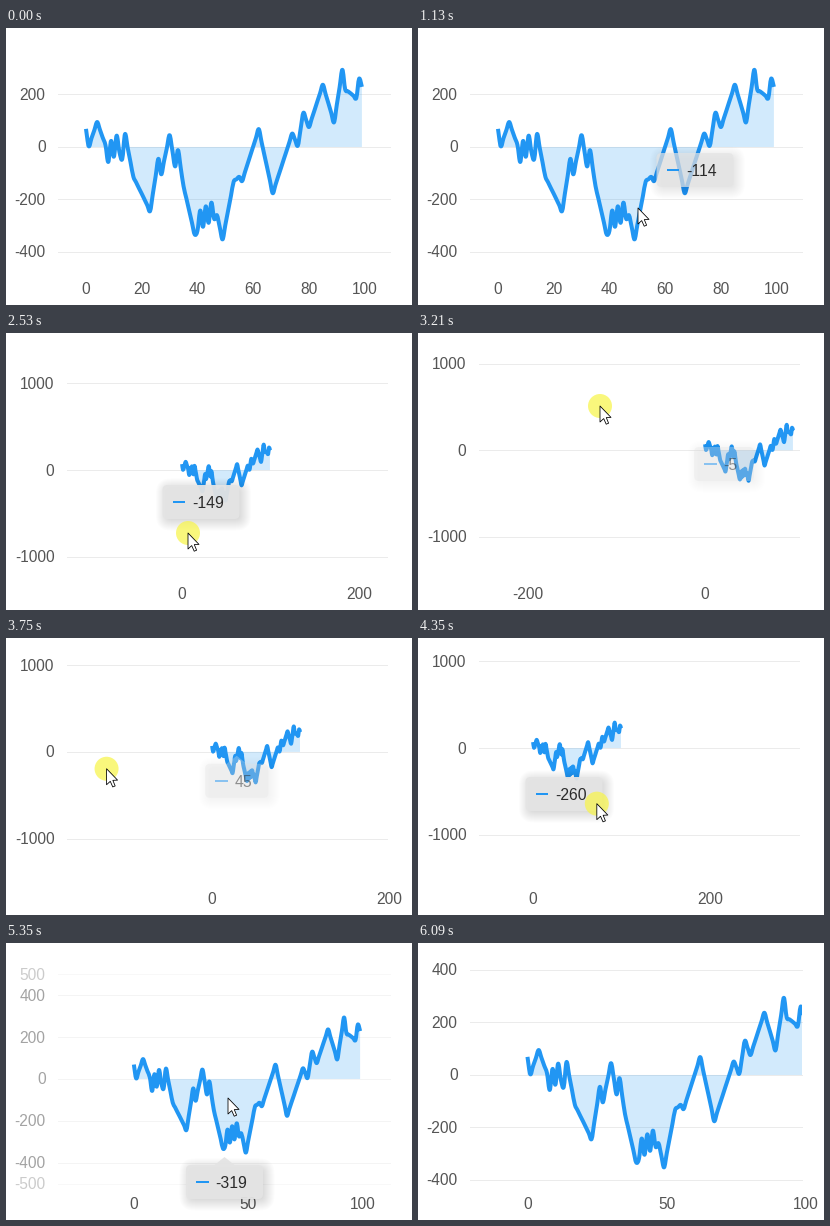
Recreate the animation shown at these times as a matplotlib script. Size 406x277 px, loop 6490 ms.

```python
import numpy as np
import matplotlib.pyplot as plt
from matplotlib.animation import FuncAnimation
from matplotlib.lines import Line2D
from matplotlib.patches import Circle, FancyBboxPatch, PathPatch, Polygon, Rectangle
from matplotlib.path import Path

W, H, DPI = 406, 277, 64
LOOP, INTERVAL, TICKS = 6490, 22, 97
PT = 72 / DPI
BLUE, GRID, INK, PANEL = "#2196f3", "#ebebeb", "#555555", "#e4e4e4"
TOP, BOTTOM, LABEL_Y = 15, 248, 266

plt.rcParams["font.family"] = "Liberation Sans"

# turning points of the series; a zigzag is added on top in two places
TURNS = [(0, 69), (1, 3), (4, 95), (8, -22), (11, 8), (13, -46), (14, 49), (17, -113),
         (23, -244), (26, -45), (27, -104), (30, 45), (32, -74), (33, -12), (35, -149),
         (39, -333), (40, -284), (46, -239), (47, -260), (49, -352), (53, -132),
         (55, -114), (56, -130), (62, 68), (67, -176), (74, 51), (76, 5), (78, 130),
         (80, 76), (85, 237), (89, 94), (92, 294), (93, 220), (97, 187), (98, 260), (99, 229)]

# data point the view turns on, and where it lies on the stage: tick, x, y
FOCUS = (50.6, -102.9)
CENTRE = [(38, 221, 146), (48, 332, 126.2), (65, 160, 119), (80, 243.5, 157.5),
          (87, 250.5, 159)]

# pointer outside the drag: tick, x, y
POINTER = [(8, 311, 266), (12, 292, 240), (14, 292, 240), (17, 220, 180), (21, 221, 146),
           (33, 221, 146), (37, 181, 200), (65, 178, 166), (74, 222, 155), (84, 222, 155),
           (87, 330, 235)]

# tick, data index, centre x, centre y
TOOLTIP = [(14, 76, 322, 75), (17, 55, 277, 142), (21, 50, 214, 223), (34, 50, 219, 195),
           (38, 35, 195, 169), (48, 15, 306, 131), (65, 47, 146, 156), (80, 40, 218.5, 239)]

ARROW = np.array([(0, 0), (0, 16), (3.7, 12.6), (6.2, 18.2), (8.6, 17.2), (6.3, 11.6),
                  (11, 11.4)])

# step: smallest and largest scale at which it is used
Y_STEPS = {200: (.18, 9), 500: (.1, .23), 1000: (.001, .15)}
X_STEPS_BEFORE = {20: (2.1, 9), 50: (1.4, 2.6), 100: (.95, 2), 200: (.01, 1.4)}
X_STEPS_AFTER = {50: (1.4, 9), 100: (.95, 2), 200: (.01, 1.4)}

fig = plt.figure(figsize=(W / DPI, H / DPI), dpi=DPI, facecolor="white")
ax = fig.add_axes([0, 0, 1, 1])
ax.set(xlim=(0, W), ylim=(H, 0))
ax.axis("off")
scene = []


def at(table, tick):
    ticks, *columns = zip(*table)
    return [np.interp(tick, ticks, c) for c in columns]


def ramp(x, start, end):
    return float(np.clip((x - start) / (end - start), 0, 1))


def ease_out(x, start, end):
    return 1 - (1 - ramp(x, start, end)) ** 2


def make_series():
    i = np.arange(100)
    trend = np.interp(i, *zip(*TURNS))
    jagged = ((i >= 8) & (i <= 11)) | ((i >= 40) & (i <= 46))
    return np.round(trend - 35 * (-1.0) ** i * jagged).astype(int)


VALUES = make_series()


def view(tick):
    """Origin and scales of the chart."""
    zoom = 1 - ease_out(tick, 23, 34) + ease_out(tick, 73, 87.4)
    sx = .887 + 1.9 * zoom
    sy = .0867 + .1758 * zoom ** 1.18
    cx, cy = at(CENTRE, tick)
    return cx - FOCUS[0] * sx, cy + FOCUS[1] * sy, sx, sy


def pointer(tick):
    """Tip of the pointer; the drag is one turn of a shrinking ellipse."""
    if not 38 <= tick <= 65:
        return at(POINTER, tick)
    angle = np.pi * (.5 - ramp(tick, 38, 48) - .98 * ramp(tick, 48, 65))
    size = 1 - .54 * ramp(tick, 48, 65)
    return [182 + 110 * size * np.cos(angle), 136.5 + 63.5 * size * np.sin(angle)]


def put(artist):
    ax.add_artist(artist)
    scene.append(artist)
    artist.set_zorder(len(scene))
    return artist


def write(x, y, text, align, color=INK, size=15.5, alpha=1):
    label = ax.text(x, y, text, ha=align, va="baseline", color=color,
                    fontsize=size * PT, alpha=alpha)
    scene.append(label)
    label.set_zorder(len(scene))


def spline(points):
    """Smooth Bezier path through the points."""
    slope = np.gradient(points, axis=0) / 3
    slope[[0, -1]] *= .5
    verts = np.stack([points[:-1] + slope[:-1], points[1:] - slope[1:], points[1:]], axis=1)
    verts = np.vstack([points[:1], verts.reshape(-1, 2)])
    return verts, [Path.MOVETO] + [Path.CURVE4] * (len(verts) - 1)


def axis_marks(steps, scale, low, high):
    """Opacity of every axis value between low and high."""
    marks = {}
    for step, (least, most) in steps.items():
        alpha = ramp(scale, least, 1.3 * least) * ramp(scale, most, .7 * most)
        if alpha > 0:
            for n in range(int(np.ceil(low / step)), int(np.floor(high / step)) + 1):
                marks[n * step] = max(alpha, marks.get(n * step, 0))
    return marks


def draw_chart(tick):
    x0, y0, sx, sy = view(tick)
    left = np.interp(sy, [.1, .2], [61, 52])
    right = np.interp(sy, [.1, .2], [380.5, 384])

    for value, alpha in axis_marks(Y_STEPS, sy, (y0 - 246) / sy, (y0 - 18) / sy).items():
        y = y0 - value * sy
        put(Line2D([left, right], [y, y], color=GRID, lw=PT, alpha=alpha))
        write(left - 12.5, y + 5.5, f"{value}", "right", alpha=alpha)

    x_steps = X_STEPS_BEFORE if tick < 45 else X_STEPS_AFTER
    for value, alpha in axis_marks(x_steps, sx, (left - x0) / sx, (right + 5 - x0) / sx).items():
        write(x0 + value * sx, LABEL_Y, f"{value}", "center", alpha=alpha)

    points = np.column_stack([x0 + np.arange(len(VALUES)) * sx, y0 - VALUES * sy])
    verts, codes = spline(points)
    ends = [(points[-1, 0], y0), (points[0, 0], y0), (points[0, 0], y0)]
    area = Path(np.vstack([verts, ends]), codes + [Path.LINETO] * 2 + [Path.CLOSEPOLY])
    window = Rectangle((left, BOTTOM), right - left, TOP - BOTTOM, transform=ax.transData)
    for patch in (PathPatch(area, fc=BLUE, ec="none", alpha=.2),
                  PathPatch(Path(verts, codes), fc="none", ec=BLUE, lw=4 * PT,
                            capstyle="butt", joinstyle="round")):
        put(patch).set_clip_path(window)


def rounded(cx, cy, w, h, radius, color, alpha):
    put(FancyBboxPatch((cx - w / 2 + radius, cy - h / 2 + radius), w - 2 * radius,
                       h - 2 * radius, boxstyle=f"round,pad={radius}", fc=color,
                       ec="none", alpha=alpha))


def draw_tooltip(tick):
    index, cx, cy = at(TOOLTIP, tick)
    value = VALUES[round(index)]
    x0, y0, sx, sy = view(tick)

    # fades while the pointer is beside the series
    px = pointer(tick)[0]
    outside = max(x0 - px, px - x0 - 99 * sx, 0)
    alpha = ramp(tick, 14, 18) * ramp(tick, 87, 84) * (1 - min(.65, outside / 150))
    if alpha == 0:
        return

    text = f"{value}"
    w, h = 46 + 8.6 * len(text) - 3.4 * (value < 0), 34
    left, top = cx - w / 2, cy - h / 2
    for grow in range(-2, 10):
        rounded(cx + 2.5, cy + 2.5, w + 2 * grow, h + 2 * grow, 6 + grow, "black", .012 * alpha)
    rounded(cx, cy, w, h, 5, PANEL, .95 * alpha)
    if top - 8 > y0 - value * sy:
        put(Polygon([(cx - 10, top), (cx, top - 8), (cx + 10, top)], fc=PANEL, ec="none",
                    alpha=.95 * alpha))
    ink = min(1, alpha * 1.4)
    put(Line2D([left + 10, left + 22.5], [cy, cy], color=BLUE, lw=2 * PT, alpha=ink,
               solid_capstyle="butt"))
    write(left + 29.5, cy + 5.8, text, "left", "#2b2b2b", 15.8, ink)


def draw_pointer(tick):
    if not 8 <= tick <= 86:
        return
    tip = pointer(tick)
    if 37 <= tick <= 70:
        put(Circle(tip, 12, fc="#f8f54a", ec="none", alpha=.72))
    put(Polygon(ARROW + tip, fc="white", ec="black", lw=.8 * PT, joinstyle="round"))


def draw(frame):
    while scene:
        scene.pop().remove()
    # poses advance in ticks, slower than the timer
    tick = min(TICKS - 1, int((frame * INTERVAL + 25) * TICKS / LOOP))
    draw_chart(tick)
    draw_tooltip(tick)
    draw_pointer(tick)
    return scene


anim = FuncAnimation(fig, draw, frames=LOOP // INTERVAL, interval=INTERVAL,
                     repeat=True, repeat_delay=0, blit=False, cache_frame_data=False)
plt.show()
```
